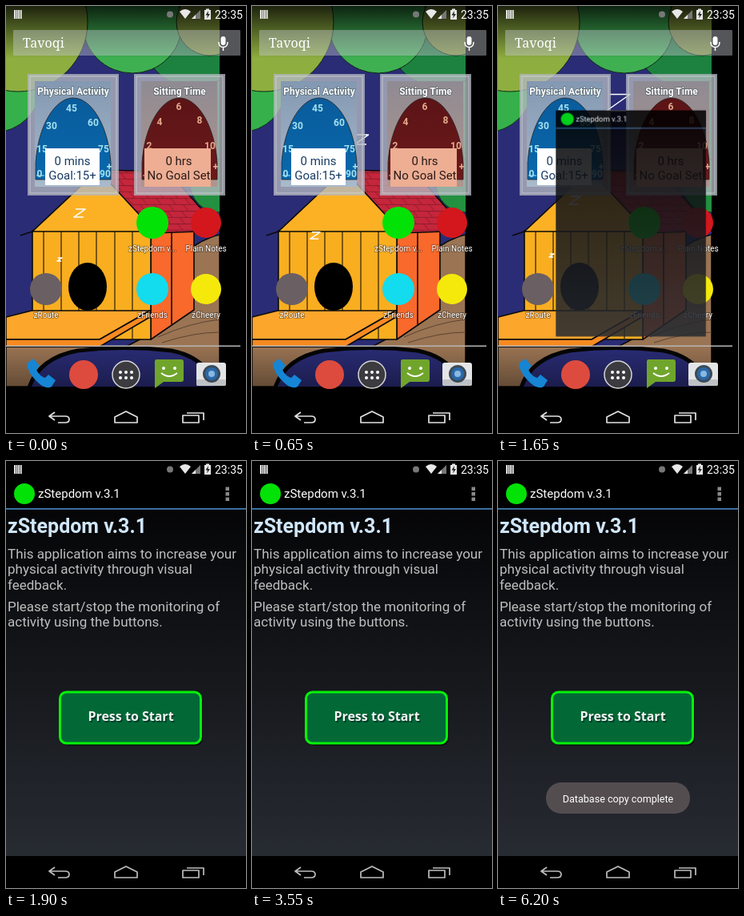
These frames come from a looping animation (300x534 px, 6250 ms). An HTML page:

```html
<!DOCTYPE html>
<html lang="en">
<head>
<meta charset="utf-8">
<title>Phone launcher</title>
<style>
  html, body { margin: 0; width: 100%; height: 100%; overflow: hidden; background: #000; }
  svg { display: block; width: 100vw; height: 100vh; }
  text { font-family: Roboto, sans-serif; fill: #fff; white-space: pre; }
  .mid { text-anchor: middle; }
  .label { font-size: 10px; text-anchor: middle; paint-order: stroke; stroke: #0006; stroke-width: 1.5px; }
  .body { font-size: 17px; fill: #bebebe; }
</style>
</head>
<body>
<svg id="stage" viewBox="0 0 300 534" preserveAspectRatio="none"></svg>
<script>
const LOOP = 6250, TICK = 50;
const APP = 'zStepdom';
const stage = document.getElementById('stage');

const rect = (x, y, w, h, fill, more = '') =>
  `<rect x="${x}" y="${y}" width="${w}" height="${h}" fill="${fill}" ${more}/>`;
const circle = (x, y, r, fill, more = '') =>
  `<circle cx="${x}" cy="${y}" r="${r}" fill="${fill}" ${more}/>`;
const path = (d, fill, more = '') => `<path d="${d}" fill="${fill}" ${more}/>`;
const text = (x, y, size, s, more = '') =>
  `<text x="${x}" y="${y}" font-size="${size}" ${more}>${s}</text>`;
const gradient = (id, top, bottom) =>
  `<linearGradient id="${id}" x2="0" y2="1"><stop stop-color="${top}"/><stop offset="1" stop-color="${bottom}"/></linearGradient>`;
const ink = 'stroke="#0a0a0a" stroke-width="1.6" stroke-linejoin="round"';

const defs = `<defs>
  ${gradient('screen', '#020203', '#272b32')}
  ${gradient('plate', '#8398b2', '#a9bacb')}
  ${gradient('plateRed', '#8f8b92', '#b0958f')}
  ${gradient('blue', '#0a5c9c', '#0868ac')}
  ${gradient('red', '#5c1416', '#6c191b')}
  ${gradient('scrim', '#000c', '#0000')}
  ${gradient('dusk', '#0000', '#000')}
  <pattern id="shingle" width="18" height="16" patternUnits="userSpaceOnUse" patternTransform="skewX(40)">
    <rect width="18" height="16" fill="#c5263b"/>
    <path d="M0 .5H18M0 8.5H18M4 0V8M13 8V16" stroke="#7c1728" stroke-width=".8"/>
  </pattern>
  <clipPath id="paper"><rect width="267" height="476"/></clipPath>
</defs>`;

function wallpaper() {
  const leaves = [
    [266, 222, 36, '#23913f'], [266, 130, 62, '#1c7a36'], [235, 35, 66, '#1d8240'],
    [158, 22, 62, '#3fb052'], [255, 20, 42, '#82983a'], [-15, 100, 58, '#35b04a'], [15, 20, 87, '#8fae40']
  ];
  const boards = [47, 69, 91, 113, 136, 158].map(x => `M${x} 281V417`).join('');
  return `<g clip-path="url(#paper)">
    ${rect(0, 0, 267, 476, '#2a2c76')}
    ${leaves.map(([x, y, r, c]) => circle(x, y, r, c, 'stroke="#0f2a14"')).join('')}
    ${path('M235 300Q250 290 267 286V476H0V426H150L200 400Z', '#9a7453', ink)}
    ${path('M190 414Q230 396 267 392M195 421Q235 408 267 408', 'none', 'stroke="#5d4330"')}
    ${path('M28 480Q40 440 90 431Q148 424 207 431Q252 440 264 480Z', '#2a2c76', 'stroke="#050505" stroke-width="5"')}
    ${path('M181 282L235 270V380L181 417Z', '#f8692b', ink)}
    ${path('M207 277V398', 'none', ink)}
    ${path('M115 205L203 207L268 281L184 284Z', 'url(#shingle)', ink)}
    ${rect(33, 281, 148, 136, '#f9ae20', ink)}
    ${path(boards, 'none', 'stroke="#4a3208" stroke-width="1.4"')}
    ${path('M115 205L33 282H186Z', '#fcb125', ink)}
    ${path('M33 282L18 287', 'none', ink)}
    <ellipse cx="102" cy="351" rx="24" ry="30"/>
    ${path('M0 389L32 381H180L117 417H0Z', '#fca62c', ink)}
    ${path('M0 417H117L180 381V389L117 426H0Z', '#f78a20', ink)}
    <path id="snore" fill="none" stroke="#fff" stroke-width="1.5" stroke-linejoin="round"/>
  </g>
  ${rect(0, 0, 300, 66, 'url(#scrim)')}
  ${rect(0, 425, 300, 51, 'url(#dusk)', 'opacity=".35"')}`;
}

function gauge(x, title, dome, plate, colour, marks) {
  const at = (dx, dy, s) => text(x + dx, dy, 12, s, `class="mid" font-weight="700" style="fill:${colour}"`);
  return rect(x, 85, 114, 152, '#b4b8bf', 'opacity=".78"') +
    rect(x + 3, 88, 108, 146, 'none', 'stroke="#dfe5ea" stroke-opacity=".6"') +
    rect(x + 9, 94, 95, 132, `url(#${plate})`) +
    path(`M${x + 10} 217V196C${x + 13} 150 ${x + 34} 115 ${x + 57} 115S${x + 101} 150 ${x + 104} 196V217Z`,
      `url(#${dome})`, 'stroke="#222c" stroke-width="1"') +
    text(x + 57, 111, 12, title, 'class="mid" font-weight="700" style="paint-order:stroke" stroke="#3448" stroke-width="1.5"') +
    marks.map(m => at(...m)).join('') +
    path(`M${x + 11} 212H${x + 21}`, 'none', `stroke="${colour}"`);
}

function widgets() {
  const caption = (x, y, s, colour) => text(x, y, 15, s, `class="mid" style="fill:${colour}"`);
  return gauge(27, 'Physical Activity', 'blue', 'plate', '#a5e2ef', [
      [55, 132, '45'], [30, 154, '30'], [82, 150, '60'], [18, 183, '15'], [95, 183, '75'],
      [15, 214, '0'], [97, 214, '90'], [102, 205, '+']]) +
    rect(49, 178, 68, 46, '#fff') +
    caption(83, 199, '0 mins', '#183b63') + caption(83, 217, 'Goal:15+', '#183b63') +
    gauge(160, 'Sitting Time', 'red', 'plateRed', '#e3ab8c', [
      [56, 130, '6'], [32, 149, '4'], [82, 147, '8'], [19, 179, '2'], [95, 179, '10'], [102, 205, '+']]) +
    rect(173, 178, 83, 48, '#edae93') +
    caption(216, 199, '0 hrs', '#2a1a1a') + caption(216, 217, 'No Goal Set', '#2a1a1a');
}

function launcherIcons() {
  const apps = [
    [183, 271, 20, '#02e206', APP + ' v...'], [250, 271, 19, '#d3171d', 'Plain Notes'],
    [50, 354, 20, '#6a5f63', 'zRoute'], [183, 354, 20, '#12dcee', 'zFriends'], [250, 354, 19, '#f5e90c', 'zCheery']
  ];
  const dots = [143, 150, 157].map(x => circle(x, 458, 2, '#fff') + circle(x, 465, 2, '#fff')).join('');
  return apps.map(([x, y, r, c, s]) =>
      circle(x, y, r, c) + `<text x="${x}" y="${y < 300 ? 307 : 390}" class="label">${s}</text>`).join('') +
    rect(0, 424.5, 293, 1.5, '#b7b5b5') +
    path('M26 447L34 441L42 450L38 455Q42 463 49 465L53 461L62 468L57 476Q50 480 40 471Q27 459 26 447Z', '#1685d4') +
    circle(97, 461, 18, '#dd4b3e') +
    circle(150, 461, 17, '#3b3b40', 'stroke="#d5d5d5" stroke-width="1.5"') + dots +
    path('M188 442H219Q222 442 222 445V467Q222 470 219 470H197L186 478V445Q186 442 188 442Z', '#70a52c') +
    circle(197, 453, 2, '#fff') + circle(211, 453, 2, '#fff') +
    path('M194 459Q204 467 214 459', 'none', 'stroke="#fff" stroke-width="2"') +
    rect(238, 446, 37, 29, '#e4e5e6', 'rx="3"') + rect(238, 467, 37, 8, '#bfc2c4', 'rx="2"') +
    circle(257, 460, 11, '#3b4a58') + circle(257, 460, 8, '#2a68a8') + circle(257, 460, 4, '#8ab8df');
}

function searchBar() {
  return rect(9, 30, 284, 32, '#c9cdd6', 'opacity=".42" rx="1"') +
    `<text x="21" y="52" style="font:16px 'Noto Serif',serif">Tavoqi</text>` +
    rect(268.5, 38, 6, 11, '#fff', 'rx="3"') +
    path('M266 45Q266 51.5 271.5 51.5T277 45M271.5 52V56', 'none', 'stroke="#fff" stroke-width="1.5"');
}

function statusIcons() {
  return [10, 12.6, 15.2, 17.8].map(x => rect(x, 5, 1.9, 11, '#e8e8e8')).join('') +
    circle(205, 10.5, 4, '#777') +
    path('M217 7Q224 1 231 7L224 16Z', '#e8e8e8') +
    path('M232 16L243 5V16Z', '#777') + path('M232 16L237 11V16Z', '#e8e8e8') +
    path('M248 5H250V3.5H254V5H256V17H248Z', '#e8e8e8') +
    path('M253 6L249.5 11.5H252L251 15.5L255 10H252.5Z', '#222') +
    text(261, 16, 14, '23:35');
}

function navIcons() {
  return `<g id="nav" fill="none" stroke-width="1.7" stroke-linejoin="round">
    <path d="M61 508L54 513L61 518M55 513H74Q79 513 79 517T74 521H65"/>
    <path d="M136 521V514L150 507L164 514V521Z"/>
    <path d="M221 512H241V521H221ZM226 509H247V518"/>
  </g>`;
}

function preview() {
  return rect(0, 23, 300, 471, 'url(#screen)') + rect(0, 23, 300, 36, '#000') +
    rect(0, 59, 300, 1.7, '#4382b8') + circle(23, 41, 13, '#02e206') + text(40, 46, 15, APP + ' v.3.1');
}

function content() {
  const lines = [
    [122, 'This application aims to increase your'], [141, 'physical activity through visual'],
    [161, 'feedback.'], [188, 'Please start/stop the monitoring of'], [207, 'activity using the buttons.']
  ];
  const caption = (shift, c) => text(156 + shift, 325 + shift, 16, 'Press to Start',
    `class="mid" style="font-family:'Open Sans',sans-serif;font-weight:700;fill:${c}"`);
  return text(2, 90, 25, APP + ' v.3.1', 'font-weight="700" style="fill:#d0e6fb"') +
    lines.map(([y, s]) => `<text x="2" y="${y}" class="body">${s}</text>`).join('') +
    rect(69, 291, 177, 65, '#000', 'rx="9" opacity=".6"') +
    rect(67.5, 289, 176, 64, '#026936', 'rx="8" stroke="#05f20a" stroke-width="3"') +
    caption(1.5, '#0229') + caption(0, '#f4f4f4') +
    '<g id="press">' + rect(253, 23, 47, 36, '#464646') + '</g>' +
    [32.5, 39, 45.5].map(y => rect(274.5, y, 4.5, 4.5, '#8a8a8a')).join('') +
    '<g id="touch">' + circle(289, 41, 10, '#d3d3d3', 'opacity=".85"') + circle(289, 41, 6, '#f0f0f0', 'opacity=".6"') + '</g>' +
    '<g id="toast">' + rect(60, 402, 180, 39, '#544d50', 'rx="19"') +
    text(150, 427, 12.6, 'Database copy complete', 'class="mid"') + '</g>';
}

stage.innerHTML = defs + rect(0, 0, 300, 534, '#000') +
  `<g id="home">${wallpaper()}${widgets()}${searchBar()}${launcherIcons()}</g>
   <g id="window">${preview()}<g id="content">${content()}</g></g>` +
  statusIcons() + navIcons();

const part = Object.fromEntries(
  ['home', 'window', 'content', 'snore', 'press', 'touch', 'toast', 'nav'].map(id => [id, document.getElementById(id)]));
const clamp = v => Math.max(0, Math.min(1, v));
const ramp = (t, from, to) => clamp((t - from) / (to - from));
const show = (name, alpha) => part[name].setAttribute('opacity', alpha);

// The wallpaper flips through four poses of sleepy letters: x, y, width.
const SNORES = [
  [[67, 317, 6], [92, 259, 14]],
  [[79, 287, 12], [137, 167, 17]],
  [[67, 312, 6], [96, 243, 14], [150, 121, 30]],
  [[79, 287, 12]]
];

function snores(t) {
  const pose = SNORES[Math.floor((t + 50) / 117) % SNORES.length];
  part.snore.setAttribute('d', pose.map(([x, y, width]) => {
    const w = width / 2, h = w * 0.7;
    return `M${x - w * 0.7} ${y - h}H${x + w}L${x - w} ${y + h}H${x + w * 0.7}`;
  }).join(''));
}

// The window grows out of its icon cell, easing out cubically.
function openWindow(t) {
  const u = ramp(t, 1596, 1846), p = 1 - (1 - u) ** 3;
  const mix = (a, b) => a + (b - a) * p;
  const left = mix(150, 0), right = mix(217, 300), top = mix(246, 23), bottom = mix(327, 494);
  const sx = (right - left) / 300, sy = (bottom - top) / 471;
  part.window.setAttribute('transform', `matrix(${sx} 0 0 ${sy} ${left} ${top - 23 * sy})`);
  part.nav.setAttribute('stroke', t < 1850 ? '#e2e2e2' : '#bdbdbd');
  show('window', clamp(u * 4));
  show('home', t < 1850 ? 1 : 0);
  show('content', t < 1900 ? 0 : 1);
}

function draw(now) {
  const t = Math.floor(now % LOOP / TICK) * TICK;
  snores(t);
  openWindow(t);
  const release = 1 - ramp(t, 2700, 2950);
  show('touch', ramp(t, 2350, 2500) * release);
  show('press', t < 2700 ? 0 : release);
  show('toast', ramp(t, 5850, 6200));
}

function frame() {
  draw(performance.now());
  requestAnimationFrame(frame);
}
frame();
</script>
</body>
</html>
```
